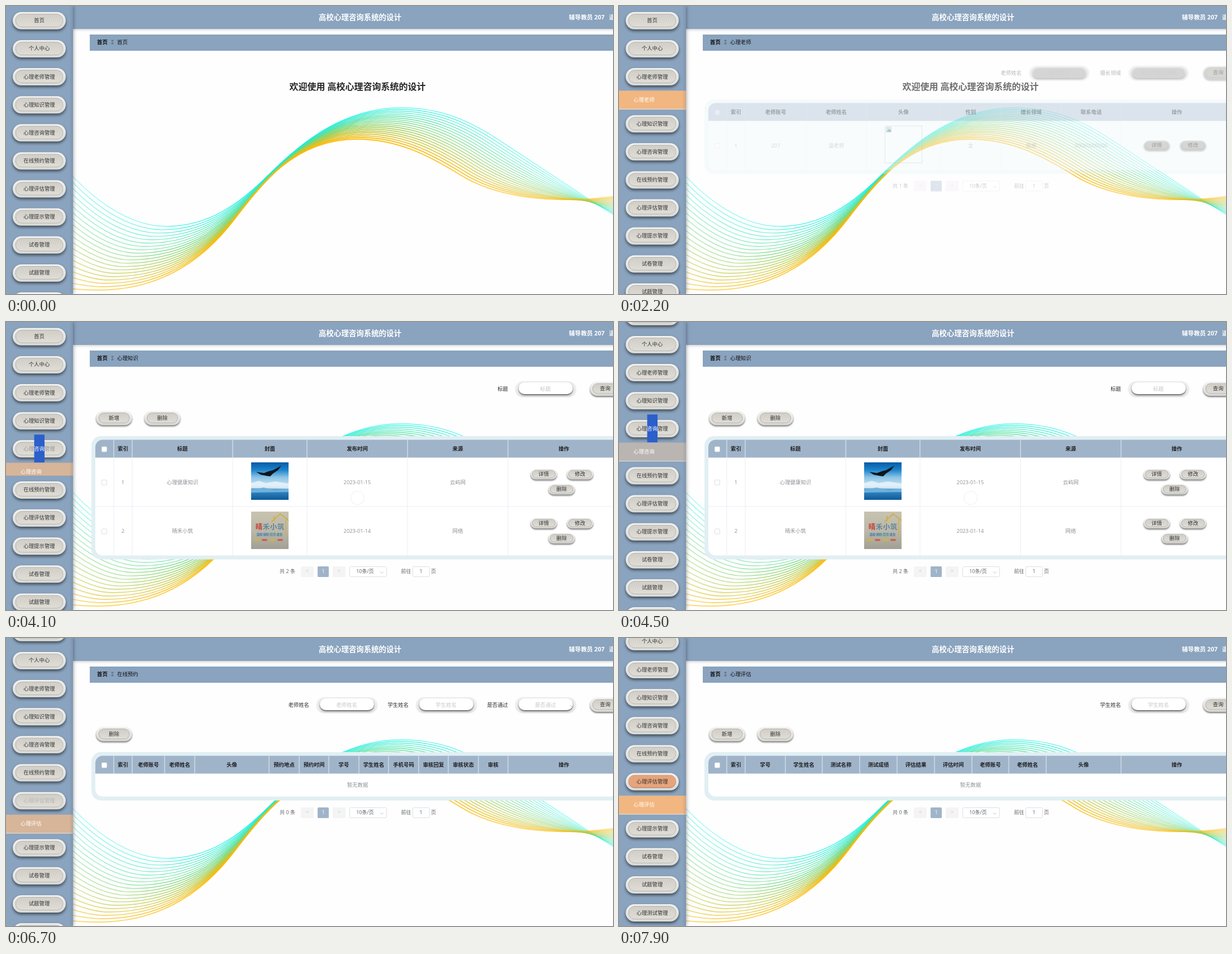
Write an HTML page with a canvas that moves like this. It is 1087x515 px and loops after 8 s.

```html
<!DOCTYPE html>
<html lang="zh">
<head>
<meta charset="utf-8">
<title>高校心理咨询系统的设计</title>
<style>
html, body { margin: 0; width: 100%; height: 100%; overflow: hidden; background: #fefefe; }
canvas { display: block; width: 1087px; height: 515px; }
</style>
</head>
<body>
<canvas id="stage"></canvas>
<script>
const W = 1087, H = 515, LOOP = 8000, STEP = 100;
const FONT = '"Open Sans", "Noto Sans CJK SC", "Noto Sans CJK", sans-serif';
const BLUE = '#8aa3be', HEAD = '#a0b4c9', DARK = '#2b2b2b', GREY = '#8f9196', PALE = '#c3c6cc';
const canvas = document.getElementById('stage');
const ratio = window.devicePixelRatio || 1;
canvas.width = W * ratio;
canvas.height = H * ratio;
const g = canvas.getContext('2d');
g.scale(ratio, ratio);

const ramp = (t, a, b) => Math.max(0, Math.min(1, (t - a) / (b - a)));
const mix = (a, b, k) => a + (b - a) * k;
const blend = (a, b, k) => `rgb(${a.map((v, i) => Math.round(mix(v, b[i], k)))})`;

// Side menu: label and entries below it
const menu = [
  ['首页'], ['个人中心', '修改密码', '个人信息'], ['心理老师管理', '心理老师'],
  ['心理知识管理', '心理知识'], ['心理咨询管理', '心理咨询'], ['在线预约管理', '在线预约'],
  ['心理评估管理', '心理评估'], ['心理提示管理'], ['试卷管理'], ['试题管理'], ['心理测试管理']
];
const clicks = [[1, 600, 1500], [2, 1500, 2600], [3, 2600, 3900], [4, 3900, 4900], [5, 4900, 6400], [6, 6400, 9000]];
const hovers = [[1, 200, 800], [2, 1200, 1900], [3, 2500, 2900], [4, 3600, 3700], [5, 4900, 5000], [6, 6000, 6400], [6, 7700, 9000]];
// menu index, entry, from, to
const entryHovers = [[1, 0, 800, 1200], [1, 1, 1250, 1260], [2, 0, 1800, 2400], [3, 0, 2900, 3500], [4, 0, 3900, 4300], [6, 0, 6500, 9000]];
const flashes = [[4, 3900, 4000, 4200], [5, 4900, 5400, 5600], [6, 6400, 6600, 6900]];

const pages = [
  { at: 0, name: '首页' },
  {
    at: 2200, name: '心理老师', top: 167,
    fields: [['擅长领域', '请选择擅长领域', 1], ['老师姓名', '老师姓名']], tools: [],
    cols: [160, 193, 226, 335, 443, 576, 684, 792, 899, 1099],
    heads: ['索引', '老师账号', '老师姓名', '头像', '性别', '擅长领域', '联系电话', '操作'],
    rows: [['1', '207', '温老师', drawMissing, '女', '情感', '00000000000']], prev: '#f4eef6'
  },
  {
    at: 3500, name: '心理知识', top: 204, fields: [['标题', '标题']], tools: ['新增', '删除'],
    cols: [160, 193, 226, 406, 539, 719, 899, 1099],
    heads: ['索引', '标题', '封面', '发布时间', '来源', '操作'],
    rows: [['1', '心理健康知识', drawSky, '2023-01-15', '云屿网'], ['2', '晴禾小筑', drawWall, '2023-01-14', '网络']],
    remove: true, spinner: true
  },
  {
    at: 5500, name: '在线预约', top: 204,
    fields: [['是否通过', '是否通过', 1], ['学生姓名', '学生姓名'], ['老师姓名', '老师姓名']], tools: ['删除'],
    cols: [160, 193, 226, 284, 338, 471, 525, 578, 632, 685, 739, 792, 846, 899, 1099],
    heads: ['索引', '老师账号', '老师姓名', '头像', '预约地点', '预约时间', '学号', '学生姓名', '手机号码', '审核回复', '审核状态', '审核', '操作'],
    rows: []
  },
  {
    at: 7100, name: '心理评估', top: 204, fields: [['学生姓名', '学生姓名']], tools: ['新增', '删除'],
    cols: [160, 193, 226, 298, 364, 431, 498, 565, 632, 698, 765, 899, 1099],
    heads: ['索引', '学号', '学生姓名', '测试名称', '测试成绩', '评估结果', '评估时间', '老师账号', '老师姓名', '头像', '操作'],
    rows: []
  }
];

function text(s, x, y, color = DARK, size = 9.4, align = 'center', weight = 400) {
  g.font = `${weight} ${size}px ${FONT}`;
  g.textAlign = align;
  g.textBaseline = 'middle';
  g.fillStyle = color;
  g.fillText(s, x, y + 0.5);
}

function rect(x, y, w, h, color) {
  g.fillStyle = color;
  g.fillRect(x, y, w, h);
}

function shape(x, y, w, h, r, fill, line) {
  g.beginPath();
  g.roundRect(x, y, w, h, r);
  if (fill) { g.fillStyle = fill; g.fill(); }
  if (line) { g.strokeStyle = line; g.lineWidth = 1; g.stroke(); }
}

function path(points, color, width = 1) {
  g.beginPath();
  points.forEach(([x, y]) => g.lineTo(x, y));
  g.strokeStyle = color;
  g.lineWidth = width;
  g.stroke();
}

function poly(points, color) {
  g.beginPath();
  points.forEach(([x, y]) => g.lineTo(x, y));
  g.fillStyle = color;
  g.fill();
}

function vertical(y0, y1, ...colors) {
  const grad = g.createLinearGradient(0, y0, 0, y1);
  colors.forEach((c, i) => grad.addColorStop(i / (colors.length - 1), c));
  return grad;
}

function shadowed(color, blur, dx, dy, draw) {
  g.save();
  g.shadowColor = color;
  g.shadowBlur = blur * ratio;
  g.shadowOffsetX = dx * ratio;
  g.shadowOffsetY = dy * ratio;
  draw();
  g.restore();
}

function button(cx, cy, w, h, label, { hot = 0, light = 0, size = 9.4 } = {}) {
  const x = cx - w / 2, y = cy - h / 2, big = h > 28;
  shadowed('rgba(0,0,0,.55)', big ? 5 : 3, 0, big ? 3 : 2, () =>
    shape(x, y, w, h, h / 2, vertical(y, y + h, '#f2f2f0', '#d9d9d6')));
  const p = big ? 4 : h > 20 ? 3.5 : 2, ix = x + p + 1, iy = y + p - 0.5, iw = w - 2 * p - 2, ih = h - 2 * p;
  shape(ix, iy, iw, ih, ih / 2, vertical(iy, iy + ih, '#cdcac3', '#dddbd3'), 'rgba(95,95,95,.32)');
  g.save();
  g.clip();
  for (let i = 0; i < iw; i += 3.5) {
    path([[ix + i, iy], [ix + i + 4, iy + ih / 2], [ix + i + 6, iy + ih]], 'rgba(255,255,255,.28)', 0.8);
  }
  if (hot) {
    g.globalAlpha *= hot;
    rect(ix, iy, iw, ih, '#c9683e');
    shape(ix, iy - 1, iw, ih - 0.5, ih / 2, '#f4b183');
  }
  g.restore();
  text(label, cx, cy, blend([50, 50, 50], [250, 250, 250], light), size);
}

function field(x, label, hint, select) {
  text(label, x - 13, 120, DARK, 9.4, 'right');
  shadowed('rgba(0,0,0,.18)', 3, 0, 1, () => shape(x + 1, 106.5, 107, 26, 13, '#ededed'));
  shadowed('rgba(0,0,0,.6)', 3, 0, 2, () => shape(x + 6, 108, 97, 21, 10.5, '#fff'));
  text(hint, x + 54, 120, PALE);
  if (select) path([[x + 98, 120], [x + 101, 123], [x + 104, 120]], PALE);
}

function drawMissing(x, y) {
  g.strokeStyle = '#bdbdbd';
  g.lineWidth = 1;
  g.strokeRect(x + 0.5, y + 0.5, 66, 66);
  rect(x + 2, y + 2, 10, 10, '#9fb6d6');
  rect(x + 3, y + 3, 8, 8, '#e4eefb');
  poly([[x + 3, y + 11], [x + 7, y + 6], [x + 11, y + 8], [x + 11, y + 11]], '#4f9a4b');
}

function drawSky(x, y) {
  rect(x, y, 67, 67, vertical(y, y + 67, '#075aa5', '#1a83cc', '#8cc4e6', '#c2dff0', '#2f80ba', '#0b5a9c'));
  poly([[x, y + 37], [x + 14, y + 33], [x + 26, y + 37], [x + 43, y + 34], [x + 67, y + 38], [x + 67, y + 47], [x, y + 46]], 'rgba(238,247,252,.75)');
  poly([[x, y + 50], [x + 22, y + 45], [x + 44, y + 50], [x + 67, y + 47], [x + 67, y + 53], [x, y + 54]], '#6fb1dc');
  poly([[x + 9, y + 17], [x + 23, y + 19], [x + 31, y + 16], [x + 39, y + 14], [x + 54, y + 6], [x + 48, y + 14], [x + 39, y + 20], [x + 34, y + 25], [x + 27, y + 24], [x + 17, y + 22]], '#10161c');
}

function drawWall(x, y) {
  rect(x, y, 67, 67, vertical(y, y + 67, '#c7c3b0', '#bcb8aa', '#a29f94'));
  path([[x + 36, y + 19], [x + 52, y + 4], [x + 67, y + 16]], '#cfae45', 2);
  path([[x + 41, y + 17], [x + 41, y + 8]], '#cfae45', 2);
  path([[x + 62, y + 14], [x + 62, y + 43]], '#cfae45', 1.5);
  ['#c23f35', '#62889b', '#5b8299', '#66899a'].forEach((c, i) => text('晴禾小筑'[i], x + 14 + i * 13, y + 28, c, 12.5, 'center', 700));
  ['#3c79ad', '#3c79ad', '#438b9d', '#3c79ad'].forEach((c, i) => text(['温和', '倾听', '陪伴', '成长'][i], x + 15 + i * 12, y + 41, c, 5.5, 'center', 700));
  for (let i = 0; i < 4; i++) shape(x + 5 + i * 14, y + 49, 10, 3.5, 2, i % 2 ? '#c9604e' : '#d2b23c');
}

// Two outer curves as Bezier points; the lines between are blended
const cyan = [[110, 294], [155, 345], [220, 394], [287, 394], [365, 394], [420, 352], [470, 302], [530, 242], [605, 182], [708, 182], [775, 182], [825, 202], [880, 238], [960, 290], [1020, 331], [1100, 381]];
const gold = [[110, 505], [130, 507], [147, 508], [165, 508], [290, 508], [365, 440], [410, 380], [450, 325], [515, 238], [628, 238], [700, 238], [755, 266], [812, 301], [870, 338], [970, 358], [1100, 339]];

function wave() {
  const lines = 20;
  for (let n = 0; n < lines; n++) {
    const k = n / (lines - 1);
    const p = cyan.map(([x, y], i) => [mix(x, gold[i][0], k), mix(y, gold[i][1], k)]);
    const rgb = [mix(0, 255, k), mix(240, 184, k), mix(225, 0, k)].map(Math.round);
    const grad = g.createLinearGradient(120, 0, W, 0);
    [[0, 0.5], [0.12, 0.62], [0.28, 0.95], [0.55, 0.95], [0.72, 0.75], [0.88, 0.5], [1, 0.38]]
      .forEach(([s, a]) => grad.addColorStop(s, `rgba(${rgb},${a})`));
    g.beginPath();
    g.moveTo(...p[0]);
    for (let i = 1; i < p.length; i += 3) g.bezierCurveTo(...p[i], ...p[i + 1], ...p[i + 2]);
    g.strokeStyle = grad;
    g.lineWidth = mix(1.1, 2, k);
    g.stroke();
  }
}

function checkbox(cy) {
  shape(171.5, cy - 4.5, 9, 9, 1.5, '#fff', '#dcdfe6');
}

function pager(y, count, fill = '#f4f4f5') {
  text(`共 ${count} 条`, 504, y, '#606266', 9);
  shape(528, y - 9.5, 23, 19, 1.5, fill);
  shape(558, y - 9.5, 20, 19, 1.5, HEAD);
  shape(585, y - 9.5, 23, 19, 1.5, fill);
  text('<', 539.5, y - 1, PALE, 9);
  text('1', 568, y, '#fff', 9);
  text('>', 596.5, y - 1, PALE, 9);
  shape(615.5, y - 9, 66, 18, 2, '#fff', '#dcdfe6');
  text('10条/页', 643, y, '#606266', 9);
  path([[670, y], [673, y + 3], [676, y]], PALE);
  text('前往', 716.5, y, '#606266', 9);
  shape(728.5, y - 9, 30, 18, 2, '#fff', '#dcdfe6');
  text('1', 743, y, '#606266', 9);
  text('页', 765.5, y, '#606266', 9);
}

function table({ top, cols, heads, rows, remove, prev }) {
  const y = top + 6.5, body = y + 32, rowH = 87.5;
  const end = body + (rows.length ? rows.length * rowH : 41);
  const mid = i => (cols[i] + cols[i + 1]) / 2;
  shape(153, top, 960, end + 7 - top, 17, '#e1eff4');
  shape(160, y, 950, end - y, 13, '#fff');
  shape(160, y, 950, 32, [13, 0, 0, 0], HEAD);
  cols.slice(1).forEach(x => rect(x - 0.5, y, 1, 32, '#e6edf3'));
  checkbox(y + 17);
  heads.forEach((s, i) => text(s, mid(i + 1), y + 16.5, '#1d1d1f', 9.4, 'center', 600));
  if (!rows.length) text('暂无数据', 629.5, body + 21, GREY);
  rows.forEach((row, r) => {
    const ry = body + r * rowH, cy = ry + 44.5, last = mid(cols.length - 2);
    if (r) rect(160, ry - 0.5, 950, 1, '#ebeef5');
    cols.slice(1).forEach(x => rect(x - 0.5, ry, 1, rowH, '#ebeef5'));
    checkbox(cy);
    row.forEach((cell, i) => typeof cell === 'string'
      ? text(cell, mid(i + 1), cy, GREY)
      : cell(Math.round(mid(i + 1) - 33.5), Math.round(cy - 36)));
    const by = remove ? cy - 14.5 : cy - 1;
    button(last - 36, by, 47, 18, '详情');
    button(last + 29, by, 47, 18, '修改');
    if (remove) button(last - 4, cy + 12.5, 47, 18, '删除');
  });
  pager(end + 29, rows.length, prev);
}

function drawPage(page, t) {
  if (!page.top) {
    text('欢迎使用 高校心理咨询系统的设计', 629.5, 145, '#262626', 16, 'center', 700);
    return;
  }
  page.fields.forEach((f, i) => field(912 - i * 178, ...f));
  button(1073, 119.5, 54, 25, '查询');
  page.tools.forEach((s, i) => button(193.5 + i * 86.5, 172, 64, 25, s));
  table(page);
  if (page.spinner) {
    g.beginPath();
    g.arc(629.5, 314.5, 12, t / 160, t < 4000 ? t / 160 + 4.6 : 20 * Math.PI + t / 160);
    g.strokeStyle = t < 4000 ? '#c9d5e1' : '#f4f5f7';
    g.lineWidth = 1.5;
    g.stroke();
  }
}

function content(t) {
  rect(0, 0, W, H, '#fefefe');
  wave();
  const now = pages.filter(p => p.at <= t).length - 1;
  const shown = now ? ramp(t, pages[now].at - 100, pages[now].at + 200) : 1;
  if (shown < 1) {
    g.globalAlpha = 1 - shown;
    drawPage(pages[now - 1], t);
  }
  g.globalAlpha = shown;
  drawPage(pages[now], t);
  g.globalAlpha = 1;
  shadowed('rgba(0,0,0,.22)', 5, 0, 1, () => rect(120, 0, W, 41, BLUE));
  rect(150, 51, W, 29, BLUE);
  text('高校心理咨询系统的设计', 634, 20.5, '#fff', 13.45, 'center', 700);
  text('辅导教员 207', 1008, 20.5, '#fff', 10.7, 'left', 700);
  text('退出', 1080, 20.5, '#fff', 10.7, 'left', 700);
  text('首页', 163, 65, '#111', 9.4, 'left', 700);
  text('Ξ', 190.5, 65, '#222', 8.5);
  text(pages[now].name, 199, 65, '#111', 9.4, 'left');
}

function glow(list, t) {
  return list.reduce((m, [a, b]) => Math.max(m, ramp(t, a, a + 300) * (1 - ramp(t, b, b + 300))), 0);
}

function sidebar(t) {
  shadowed('rgba(0,0,0,.35)', 6, 1, 0, () => rect(0, 0, 120, H, BLUE));
  g.save();
  g.beginPath();
  g.rect(0, 0, 120, H);
  g.clip();
  const scroll = 36 * ramp(t, 4200, 4500) + 34 * ramp(t, 7400, 7700);
  let y = 26.3 - scroll;
  menu.forEach(([label, ...entries], i) => {
    const hot = glow(hovers.filter(h => h[0] === i).map(h => h.slice(1)), t);
    const flash = flashes.find(f => f[0] === i);
    const light = flash && t > flash[1] ? 1 - ramp(t, flash[2], flash[3]) : 0;
    button(59.5, y, 95, 31, label, { hot, light });
    if (i === 4 && t >= 4000 && t < 5000) {
      rect(50.5, y - 25.5, 18.5, 50, '#2b5fca');
      text('咨询', 59.5, y, '#fff');
    }
    const click = clicks.find(c => c[0] === i);
    const open = click ? ramp(t, click[1], click[1] + 290) * (1 - ramp(t, click[2], click[2] + 200)) : 0;
    const h = 34 * entries.length * open;
    if (h > 0) {
      const top = y + 24.6;
      g.save();
      g.beginPath();
      g.rect(0, top, 120, h);
      g.clip();
      entries.forEach((s, n) => {
        const over = glow(entryHovers.filter(e => e[0] === i && e[1] === n).map(e => e.slice(2)), t);
        const ey = top + n * 34;
        rect(0, ey, 120, 34, blend([160, 180, 201], [242, 182, 129], over));
        rect(0, ey + 33, 120, 1, '#e9edf1');
        text(s, 26, ey + 16.5, '#fff', 9.4, 'left');
      });
      g.restore();
    }
    y += 50.13 + h;
  });
  const edge = g.createLinearGradient(113, 0, 120, 0);
  edge.addColorStop(0, 'rgba(60,80,105,0)');
  edge.addColorStop(1, 'rgba(60,80,105,.16)');
  rect(113, 0, 7, H, edge);
  g.restore();
}

function frame(now) {
  const t = Math.floor((now % LOOP) / STEP) * STEP;
  content(t);
  sidebar(t);
  requestAnimationFrame(frame);
}
requestAnimationFrame(frame);
</script>
</body>
</html>
```
